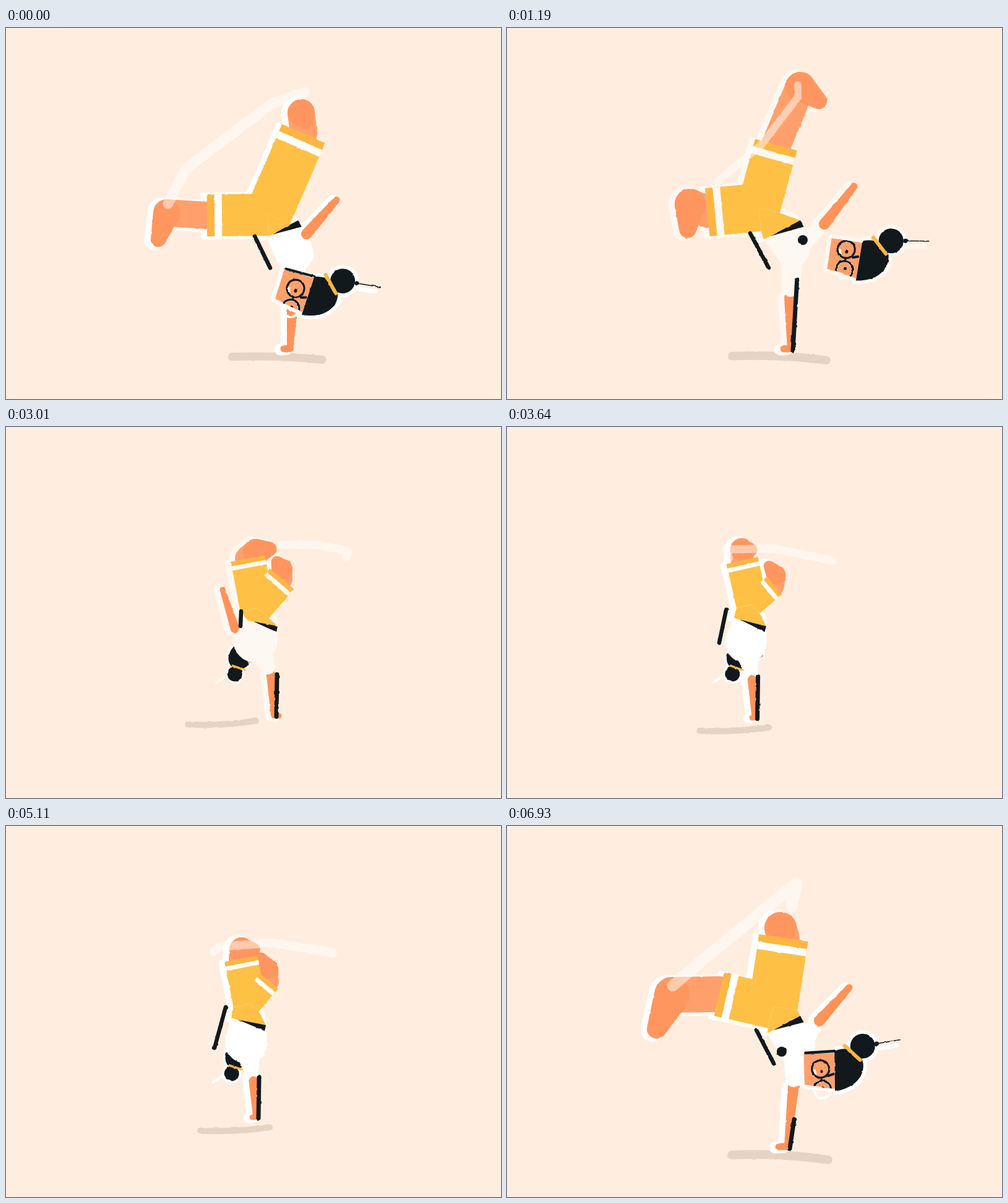
An HTML page with a canvas that plays this animation: 800x600 px, repeating every 7 s.

```html
<!DOCTYPE html>
<html lang="en">
<head>
<meta charset="utf-8">
<title>Handstand spin</title>
<style>
  html, body { margin: 0; width: 100%; height: 100%; overflow: hidden; background: #ffeedf; }
  canvas { display: block; width: 800px; height: 600px; filter: url(#rough); }
  svg { position: absolute; width: 0; height: 0; }
</style>
</head>
<body>
<canvas id="stage" width="800" height="600"></canvas>
<svg><filter id="rough" x="0" y="0" width="1" height="1" color-interpolation-filters="sRGB">
  <feTurbulence type="fractalNoise" baseFrequency=".11" numOctaves="2" seed="4"/>
  <feDisplacementMap in="SourceGraphic" scale="2.5" xChannelSelector="R" yChannelSelector="G"/>
</filter></svg>
<script>
const ctx = document.getElementById('stage').getContext('2d');
const STEP = 70, CYCLE = 20;
const PAPER = '#ffeedf', INK = '#12191d', SKIN = '#ffa06c', TOE = '#ff9660', ARM = '#ff935a',
      CLOTH = '#fec146', CUFF = '#fdb643', GLOW = 'rgba(255,255,255,.48)';

// Joints of the dancer. Legs: knee, half width, heel, radius, toe. Arms: shoulder, hand.
// armDown ends with the reach of the fist; head is centre, degrees, sideways look;
// shadow is centre, half length; stripe is where the arm's shade line begins.
const front = {
  size: 1, stripe: 1, shadow: [438, 534, 73], hip: [424, 302], waist: [421, 339, 472, 311],
  legA: [325, 303, 34, 260, 299, 22, 246, 342], legB: [481, 171, 38, 477, 137, 22, 484, 152],
  chest: [466, 364, 31], armUp: [486, 333, 534, 278], armDown: [463, 450, 459, 518, -10],
  tick: [402, 337, 427, 388], head: [467, 425, 14, 10],
  trail: [482, 104, 430, 122, 290, 228, 262, 284, 17]
};
const away = {
  size: .6, stripe: 0, pale: true, shadow: [349, 478, 55], hip: [406, 293], waist: [391, 313, 439, 322],
  legA: [391, 213, 28, 404, 202, 21, 426, 197], legB: [446, 246, 25, 446, 230, 17, 438, 218],
  chest: [403, 345, 36], armUp: [370, 326, 350, 263], armDown: [428, 400, 433, 466, 8],
  tick: [380, 298, 379, 322], head: [397, 361, 151, 0],
  trail: [445, 190, 505, 191, 553, 200, 550, 210, 13]
};
const split = {
  size: .6, stripe: 0, shadow: [349, 478, 55], hip: [411, 281], waist: [384, 295, 411, 323],
  legA: [380, 223, 18, 369, 188, 10, 354, 191], legB: [484, 296, 17, 510, 298, 13, 503, 307],
  chest: [374, 338, 28], armUp: [368, 387, 363, 389], armDown: [372, 385, 377, 465, 7],
  tick: [349, 312, 384, 282], head: [399, 361, 165, 0],
  trail: [518, 277, 416, 219, 440, 250, 515, 294, 7]
};
const tuck = {
  size: .6, stripe: 0, shadow: [370, 490, 56], hip: [394, 288], waist: [364, 311, 420, 322],
  legA: [380, 215, 27, 381, 200, 20, 400, 200], legB: [425, 251, 19, 424, 231, 16, 412, 213],
  chest: [388, 350, 34], armUp: [400, 412, 402, 440], armDown: [399, 406, 404, 470, -6],
  tick: [355, 293, 337, 359], head: [392, 362, 151, 0],
  trail: [336, 203, 345, 195, 430, 189, 528, 205, 14]
};
const kick = {
  size: 1, stripe: -.35, pale: true, shadow: [440, 534, 76], hip: [407, 290], waist: [415, 342, 474, 311],
  legA: [324, 298, 39, 296, 285, 25, 292, 326], legB: [435, 189, 35, 474, 95, 24, 504, 118],
  chest: [462, 360, 27], armUp: [513, 317, 561, 256], armDown: [457, 436, 458, 518, -11],
  tick: [393, 332, 423, 388], head: [547, 372, 5, 0], dot: [478, 343, 8],
  trail: [470, 92, 470, 112, 410, 190, 340, 248, 12]
};
const land = {
  size: 1, stripe: .55, shadow: [441, 536, 78], hip: [430, 292], waist: [421, 335, 474, 307],
  legA: [343, 272, 36, 267, 273, 29, 242, 328], legB: [447, 181, 40, 442, 165, 26, 452, 170],
  chest: [468, 358, 30], armUp: [505, 315, 553, 261], armDown: [463, 421, 453, 518, -14],
  tick: [403, 330, 431, 384], head: [507, 396, -5, 11], dot: [444, 365, 8],
  trail: [460, 130, 468, 92, 310, 222, 268, 258, 19]
};
const sweep = {
  ...kick, pale: false, head: [455, 372, 5, 0],
  legA: [300, 284, 36, 200, 285, 24, 185, 322], legB: [448, 198, 35, 470, 150, 23, 487, 160],
  trail: [195, 260, 260, 200, 360, 160, 465, 140, 14]
};
const keys = [[0, front], [3, away], [5, split], [13, tuck], [15, sweep], [17, kick], [19, land], [CYCLE, front]];

const mix = (a, b, p) => Array.isArray(a) ? a.map((v, i) => mix(v, b[i], p)) : a + (b - a) * p;

function poseAt(step) {
  const n = keys.findIndex(([at]) => at > step);
  const [from, a] = keys[n - 1], [to, b] = keys[n];
  let p = (step - from) / (to - from);
  if (a === front) p **= 1.7;
  const pose = { ...(p < .5 ? a : b) };
  for (const part in pose)
    if (part !== 'pale' && part in a && part in b) pose[part] = mix(a[part], b[part], p);
  return pose;
}

function polygon(...pts) {
  const path = new Path2D();
  pts.forEach(pt => path.lineTo(...pt));
  path.closePath();
  return path;
}

// Outline around two circles joined by their outer tangents.
function capsule([x, y], r, [u, v], s) {
  const path = new Path2D(), d = Math.hypot(u - x, v - y), a = Math.atan2(v - y, u - x);
  if (d <= Math.abs(r - s)) {
    r > s ? path.arc(x, y, r, 0, 7) : path.arc(u, v, s, 0, 7);
    return path;
  }
  const t = Math.acos((r - s) / d);
  path.arc(x, y, r, a + t, a - t + 2 * Math.PI);
  path.arc(u, v, s, a - t, a + t);
  path.closePath();
  return path;
}

const circle = (c, r) => capsule(c, r, c, 0);

// Crosswise slice of a thigh; from and to are distances back from the knee.
function slice(hip, knee, half, from, to) {
  const d = Math.hypot(knee[0] - hip[0], knee[1] - hip[1]);
  const dx = (knee[0] - hip[0]) / d, dy = (knee[1] - hip[1]) / d;
  const at = (back, side) => [knee[0] - dx * back - dy * side, knee[1] - dy * back + dx * side];
  return [at(from, half), at(to, half), at(to, -half), at(from, -half)];
}

function fill(path, color) {
  ctx.fillStyle = color;
  ctx.fill(path);
}

function stroke(path, color, width) {
  ctx.strokeStyle = color;
  ctx.lineWidth = width;
  ctx.stroke(path);
}

function line(color, width, ...pts) {
  const path = new Path2D();
  pts.forEach(pt => path.lineTo(...pt));
  stroke(path, color, width);
}

// White paper edge peeking out on the left of a part.
function rim(path, white) {
  ctx.save();
  ctx.translate(-6, 1);
  fill(path, white);
  stroke(path, white, 8);
  ctx.restore();
}

function drawShadow([x, y, half]) {
  const tilt = (half - 65) * .3, path = new Path2D();
  path.moveTo(x - half, y - tilt);
  path.quadraticCurveTo(x, y - 2 * tilt, x + half, y + tilt);
  stroke(path, '#e6d3c4', half * .18);
}

function makeLeg([kx, ky, half, hx, hy, r, tx, ty], hip, size) {
  const knee = [kx, ky], heel = [hx, hy], hem = 12 * size, length = Math.hypot(kx - hip[0], ky - hip[1]);
  const thigh = slice(hip, knee, half, length, 0);
  return {
    ends: thigh, thigh: polygon(...thigh),
    cuff: polygon(...slice(hip, knee, half, hem, 0)),
    band: polygon(...slice(hip, knee, half, hem * 2, hem)),
    shin: capsule(knee, r, heel, r), foot: capsule(heel, r, [tx, ty], r * .55)
  };
}

// The head lies on its side: x points to the crown, y runs along the eyes.
function drawHead([x, y, degrees, look], size, white) {
  const face = polygon([-25, -30], [25, -27], [20, 31], [-28, 20]);
  const hair = new Path2D('M25 -30 C80 -46 90 30 20 35 Z');
  const bun = circle([71, -34], 20);
  ctx.save();
  ctx.translate(x, y);
  ctx.rotate(degrees * Math.PI / 180);
  ctx.scale(size, size);
  for (const part of [face, hair, bun]) stroke(part, white, 12);
  line(white, 7, [98, -28], [126, -30]);
  fill(face, SKIN);
  if (look) line(INK, look * .4, [-22, -31], [25, -30]);
  fill(hair, INK);
  fill(bun, INK);
  line(CUFF, 6, [42, -37], [65, -12]);
  if (size > .8) {
    line(INK, 1.5, [94, -36], [132, -39]);
    fill(circle([94, -36], 3.5), INK);
  }

  const upper = circle([0, look - 14], 14), lower = circle([0, look + 19], 14);
  stroke(lower, white, 4);
  ctx.clip(face);
  line(white, 4, [-10, look - 12], [-9, look - 6]);
  for (const lens of [upper, lower]) stroke(lens, INK, 3.2);
  line(INK, 3, [0, look], [0, look + 5]);
  for (const eye of [-10, 17]) fill(circle([1, look + eye], 2.5), INK);
  line(INK, 4, [12, look - 2], [20, look - 4]);
  ctx.restore();
}

function draw(pose) {
  const { size, hip, waist, chest, armUp, armDown, tick, trail, stripe } = pose;
  const white = pose.pale ? '#fdf8f2' : '#fff', thin = (1 + size) / 2;
  const left = waist.slice(0, 2), right = waist.slice(2), core = chest.slice(0, 2);
  const middle = mix(left, right, .5), waistR = Math.hypot(right[0] - left[0], right[1] - left[1]) / 2;

  const legs = [makeLeg(pose.legA, hip, size), makeLeg(pose.legB, hip, size)];
  const pelvis = polygon(hip, legs[1].ends[0], right, left, legs[0].ends[3]);
  const [root, palm, shoulder, wrist] = [armUp.slice(0, 2), armUp.slice(2), armDown.slice(0, 2), armDown.slice(2, 4)];
  const raised = capsule(root, 9 * thin, palm, 5.5 * thin);
  const arm = capsule(shoulder, 9 * thin, wrist, 5);
  const fist = capsule(wrist, 6 * thin, [wrist[0] + armDown[4], wrist[1] + 1], 5.5 * thin);

  fill(polygon([0, 0], [800, 0], [800, 600], [0, 600]), PAPER);
  drawShadow(pose.shadow);
  for (const part of [...legs.flatMap(l => [l.shin, l.foot, l.thigh]), pelvis, raised, arm, fist]) rim(part, white);
  if (size < .8) drawHead(pose.head, size, white);

  fill(arm, ARM);
  fill(fist, ARM);
  fill(capsule(middle, waistR, core, chest[2]), white);
  fill(capsule(core, chest[2] * .7, mix(shoulder, core, .2), 14 * thin), white);
  fill(capsule(core, chest[2] * .7, mix(root, core, .1), 10 * thin), white);

  for (const leg of legs) {
    fill(leg.shin, SKIN);
    fill(leg.foot, TOE);
  }
  for (const part of [legs[0].thigh, legs[1].thigh, pelvis]) fill(part, CLOTH);
  for (const leg of legs) {
    fill(leg.cuff, CUFF);
    fill(leg.band, white);
  }

  const drop = 6 * thin / waistR;
  fill(polygon(mix(left, right, .18), right,
    [right[0] - (right[1] - left[1]) * drop, right[1] + (right[0] - left[0]) * drop]), INK);
  if (pose.dot) fill(circle(pose.dot, pose.dot[2]), INK);
  fill(raised, ARM);
  if (stripe < 1) {
    const [x, y] = mix(shoulder, wrist, stripe);
    line(INK, 7, [x + mix(10, 4, stripe), y], [wrist[0] + 4, wrist[1] + 4 * size]);
  }
  line(INK, 6.5, tick.slice(0, 2), tick.slice(2));
  if (size >= .8) drawHead(pose.head, size, white);
  line(GLOW, trail[8], ...[0, 2, 4, 6].map(i => trail.slice(i, i + 2)));
}

ctx.lineCap = ctx.lineJoin = 'round';
const start = performance.now();
function play() {
  draw(poseAt(Math.floor((performance.now() - start) / STEP) % CYCLE));
  requestAnimationFrame(play);
}
play();
</script>
</body>
</html>
```
